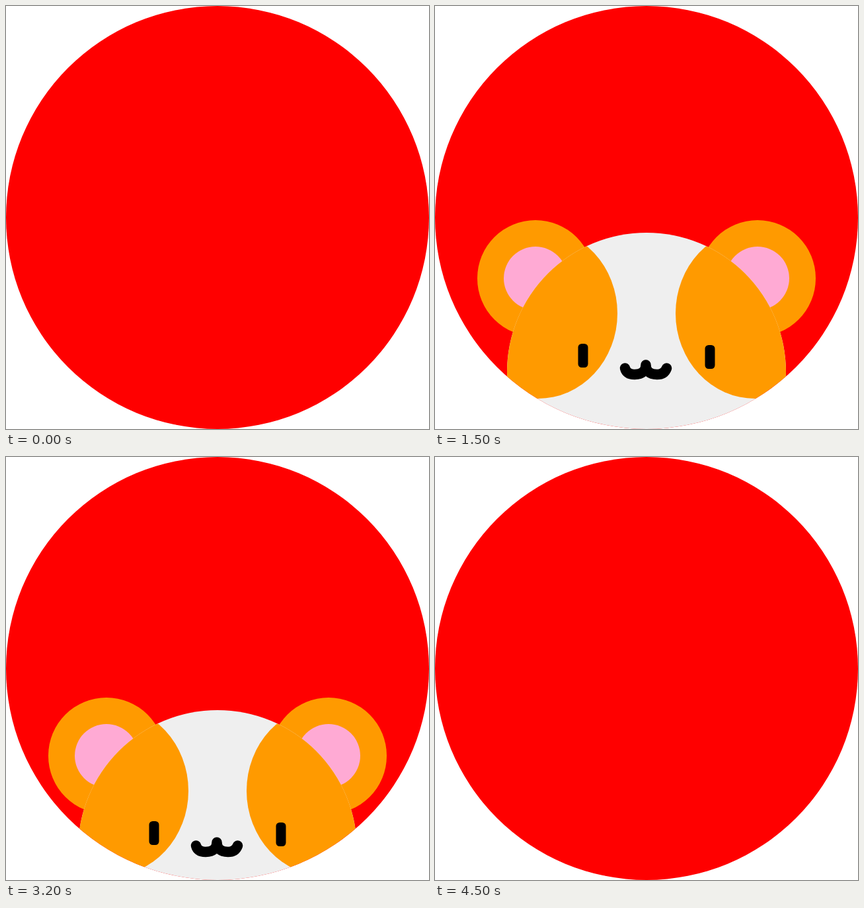
An HTML page that plays this animation: 640x640 px, repeating every 4600 ms.

```html
<!DOCTYPE html>
<html lang="en">
<head>
<meta charset="utf-8">
<title>Peeking hamster</title>
<style>
  html, body { margin: 0; width: 100%; height: 100%; overflow: hidden; background: #fff; }
  svg { display: block; width: 100vw; height: 100vh; }

  /* Moves 20px every 100ms: up, pause, down. */
  .hamster { animation: peek 4600ms infinite; }
  @keyframes peek {
    0% { transform: translateY(360px); animation-timing-function: steps(18, end); }
    39.1304% { transform: translateY(0); animation-timing-function: linear; }
    58.6956% { transform: translateY(0); animation-timing-function: steps(19, end); }
    100% { transform: translateY(380px); }
  }

  .fur { fill: #ff9a00; }
  .skin { fill: #ffaad4; }
  .mouth { fill: none; stroke: #000; stroke-width: 15.5; stroke-linecap: round; stroke-linejoin: round; }
</style>
</head>
<body>
<svg viewBox="0 0 640 640">
  <defs>
    <clipPath id="disc"><circle cx="320" cy="320" r="320"/></clipPath>
    <clipPath id="head"><circle cx="320" cy="494" r="211"/></clipPath>
    <g id="ear">
      <circle class="fur" cx="152" cy="352" r="88"/>
      <circle class="skin" cx="152" cy="352" r="48"/>
    </g>
    <ellipse id="patch" class="fur" cx="156" cy="405" rx="120" ry="129"/>
    <rect id="eye" x="-7.5" y="-18" width="15" height="36" rx="5.5"/>
  </defs>

  <circle cx="320" cy="320" r="320" fill="#f00"/>
  <g clip-path="url(#disc)">
    <g class="hamster">
      <use href="#ear"/>
      <use href="#ear" transform="matrix(-1 0 0 1 640 0)"/>
      <circle cx="320" cy="494" r="211" fill="#efefef"/>
      <g clip-path="url(#head)">
        <use href="#patch"/>
        <use href="#patch" transform="matrix(-1 0 0 1 640 0)"/>
      </g>
      <use href="#eye" x="224" y="469"/>
      <use href="#eye" x="416" y="471"/>
      <path class="mouth" d="M287.5 488Q290 497.5 302 497.5Q319 497 319 483Q319 497 336 497.5Q347 497.5 350.5 488"/>
    </g>
  </g>
</svg>
</body>
</html>
```
